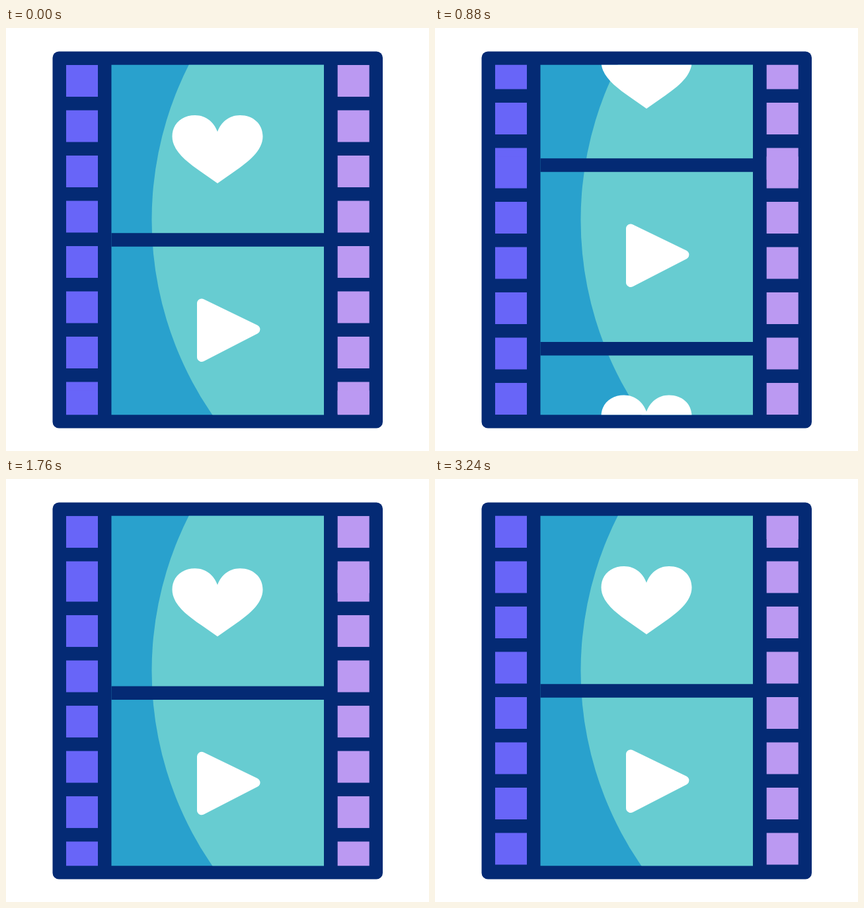
An HTML page for the animation above (3400 ms loop, 640x640 px).

```html
<!DOCTYPE html>
<html lang="en">
<head>
<meta charset="utf-8">
<title>Film strip</title>
<style>
  html, body { margin: 0; width: 100%; height: 100%; overflow: hidden; background: #fff; }
  svg { display: block; width: 100vw; height: 100vh; }
</style>
</head>
<body>
<svg viewBox="0 0 640 640">
  <defs>
    <clipPath id="panel"><rect x="159.5" y="55.7" width="321.5" height="529.5"/></clipPath>
    <clipPath id="holes"><rect x="80" y="55.7" width="480" height="529.5"/></clipPath>
    <path id="heart" fill="#fff" d="M320 157C315 143 303 132 286 132C266 132 251.5 145 251.5 164
      C251.5 186 274 203 295 217.5L320 235L345 217.5C366 203 388.5 186 388.5 164
      C388.5 145 374 132 354 132C337 132 325 143 320 157Z"/>
    <path id="play" fill="#fff" stroke="#fff" stroke-width="14" stroke-linejoin="round"
      d="M296 416.5L377.5 456L296 498Z"/>
    <path id="bars" fill="#042a74" d="M159 310.2H482V330.7H159ZM159 588H482V608.5H159Z"/>
  </defs>
  <rect x="70.5" y="35.5" width="499.5" height="570" rx="9.5" fill="#042a74"/>
  <g clip-path="url(#panel)">
    <rect x="159" y="55" width="323" height="531" fill="#29a1cd"/>
    <circle cx="740" cy="290.5" r="519.5" fill="#67ccd1"/>
    <g id="reels"></g>
  </g>
  <g id="rows" clip-path="url(#holes)"></g>
</svg>
<script>
const LOOP = 3400, STEP = 40, LAST = 3240;
const NS = 'http://www.w3.org/2000/svg';

// Each key: time, value, speed per ms
const reelKeys = [[0, 0, 0], [560, 259, 1.387], [880, 712, 1.36], [1200, 1129.5, 1.37],
  [1480, 1534.5, 1.4], [1860, 1712.5, 0]];
const rowKeys = [[0, 0, 0], [560, 130, .6], [880, 354, .71], [1200, 573, .68],
  [1480, 760, .61], [2120, 983.2, .02], [2320, 985, 0]];
const heartKeys = [[1960, 1, 0], [2140, .895, 0], [2380, 1.15, 0], [2640, 1, 0]];
const playKeys = [[2640, 0, 0], [2840, -20, 0], [3040, 20, 0], [3240, 0, 0]];

const reelStarts = [0, 599, 1135.5, 1712.5];
const rowStarts = [0, 492.5, 985];

function curve(keys, t) {
  if (t <= keys[0][0]) return keys[0][1];
  for (let i = 1; i < keys.length; i++) {
    const [t0, a, va] = keys[i - 1], [t1, b, vb] = keys[i];
    if (t > t1) continue;
    const d = t1 - t0, u = (t - t0) / d, w = 1 - u;
    return a * w * w * (1 + 2 * u) + b * u * u * (3 - 2 * u) + d * u * w * (va * w - vb * u);
  }
  return keys[keys.length - 1][1];
}

function add(parent, tag, attrs = {}) {
  const el = document.createElementNS(NS, tag);
  for (const key in attrs) el.setAttribute(key, attrs[key]);
  return parent.appendChild(el);
}

const shift = (el, x, y) => el.setAttribute('transform', `translate(${x} ${y})`);

const reels = reelStarts.map(() => {
  const g = add(document.getElementById('reels'), 'g');
  add(g, 'use', { href: '#bars' });
  return { g, heart: add(g, 'use', { href: '#heart' }), play: add(g, 'use', { href: '#play' }) };
});

const rows = rowStarts.map(() => {
  const g = add(document.getElementById('rows'), 'g');
  for (let i = 0; i < 8; i++) {
    const y = 56 + i * 68.5;
    add(g, 'rect', { x: 91, y, width: 48, height: 48, fill: '#6865f8' });
    add(g, 'rect', { x: 501.7, y, width: 48, height: 48, fill: '#bb99f2' });
  }
  return g;
});

function draw(t) {
  const reelPos = curve(reelKeys, t), rowPos = curve(rowKeys, t);
  reels.forEach((reel, i) => shift(reel.g, 0, reelStarts[i] - reelPos));
  rows.forEach((row, i) => shift(row, 0, rowStarts[i] - rowPos));
  const { heart, play } = reels[reels.length - 1];
  heart.setAttribute('transform',
    `translate(320 183.4) scale(${curve(heartKeys, t)}) translate(-320 -183.4)`);
  shift(play, curve(playKeys, t), 0);
}

const start = performance.now();
function tick() {
  const t = (performance.now() - start) % LOOP;
  draw(Math.min(LAST, Math.floor(t / STEP) * STEP));
  requestAnimationFrame(tick);
}
tick();
</script>
</body>
</html>
```
